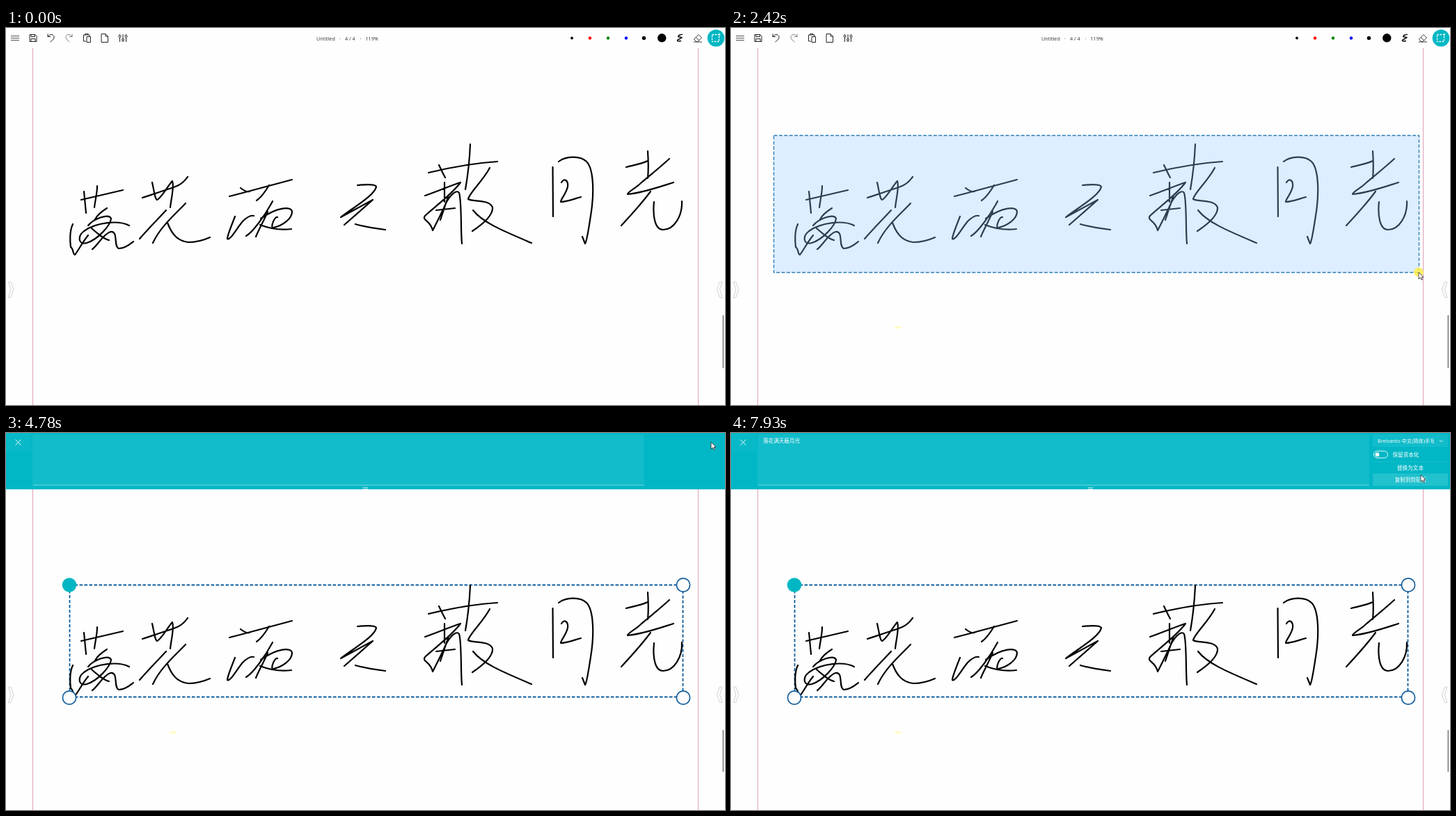
An HTML page for the animation above (7990 ms loop, 1033x542 px).

```html
<!DOCTYPE html>
<html lang="zh">
<head>
<meta charset="utf-8">
<title>Ink selection</title>
<style>
html, body { margin: 0; width: 100%; height: 100%; overflow: hidden; background: #fefefe; }
svg { display: block; width: 1033px; height: 542px; }
text { font-family: "Open Sans", "Noto Sans CJK SC", "Noto Sans CJK", "Noto Sans", sans-serif; font-size: 7.2px; }
.cn text { font-size: 7.6px; fill: #fff; }
.icon { fill: none; stroke: #222; stroke-width: 1; }
.white { stroke: #fff; stroke-width: .9; }
.ink { fill: none; stroke: #000; stroke-width: 2.2; stroke-linecap: round; stroke-linejoin: round; }
.handle { fill: #fefefe; stroke: #15609f; stroke-width: 1.7; }
</style>
</head>
<body>
<svg viewBox="0 0 1033 542">
  <defs><clipPath id="fieldClip"><path d="M923 2H1010V21H923Z"/></clipPath></defs>
  <path d="M38.5 29V542M994.5 29V542" stroke="#dd9fb7"/>
  <ellipse id="trace" cx="240" cy="430.5" rx="5" ry="1.7" fill="#fffcc4"/>

  <g id="page">
    <g id="frame">
      <path d="M91.5 166.5H972.5V327.5H91.5Z" fill="none" stroke="#0d5d9e" stroke-width="1.8" stroke-dasharray="4.6 2.4"/>
    </g>
    <g class="ink">
      <path d="M108 247L168 233M112 235L115 266M131 227C131 238 128 248 127 258"/>
      <path d="M96 282C91 292 92 308 93 315C97 317 96 326 99 326C104 320 109 309 118 298"/>
      <path d="M145 259C137 264 131 269 128 275M118 284C126 274 148 266 151 274C150 284 132 304 116 309C104 312 102 300 112 292C130 279 162 276 177 284"/>
      <path d="M123 288C132 296 140 303 148 305M124 318C132 312 140 296 150 293C162 291 154 314 162 317C171 317 178 311 183 307"/>
      <path d="M196 244C214 238 236 231 246 227C255 223 258 218 261 214M210 222C213 235 214 246 217 247C223 245 233 226 239 220C242 229 237 246 236 258"/>
      <path d="M192 303C205 288 218 275 230 262M258 252C245 266 222 285 211 309M232 280C238 296 246 306 262 308C274 308 284 305 293 301"/>
      <path d="M321 242C352 234 384 225 411 218M337 230C342 234 346 236 350 235M378 226C372 236 366 244 360 248"/>
      <path d="M329 271C324 284 318 298 318 303C322 306 330 290 340 278C346 272 352 269 356 270M345 299C354 294 372 270 383 249"/>
      <path d="M376 264C370 278 362 292 359 300M366 274C390 257 410 256 411 264C411 274 398 284 384 287C379 288 386 270 390 272M365 283C378 288 395 291 410 289"/>
      <path d="M505 226C515 225 530 224 532 228C530 240 502 256 481 272L527 247L486 283M502 282C515 286 530 288 545 290"/>
      <path d="M667 167C666 190 663 215 660 232M607 208C640 200 675 194 706 192M622 197C625 203 627 208 631 215"/>
      <path d="M602 241C620 235 640 226 653 222C640 240 612 260 602 270C597 277 610 276 613 291C616 285 624 270 633 250C640 238 648 232 651 237C655 250 653 290 655 310M630 222V250M618 262L645 259M636 240L624 276"/>
      <path d="M695 201C685 220 665 238 664 246C670 250 695 246 699 258C700 270 682 284 670 292M671 262C685 280 715 292 755 309"/>
      <path d="M785.500 200L786 271M794 192C804 184 825 183 834 192C845 203 845 240 840 270C837 290 834 308 832 310L828 300M798 222C802 215 808 219 807 228C805 238 797 246 797 250C805 250 815 246 826 243"/>
      <path d="M922 177C923 192 923 206 922 216M891 200C903 197 914 195 922 191M953 188C940 200 925 212 912 223C905 230 893 236 893 239C915 237 940 228 959 222"/>
      <path d="M926 235C915 250 897 270 884 284M931 250C929 270 932 290 944 290C960 290 972 270 971 249"/>
    </g>
    <g id="handles">
      <circle cx="91" cy="166.500" r="10.300" fill="#02b7c3"/>
      <g class="handle">
        <circle cx="973" cy="166.500" r="9.600"/><circle cx="91" cy="328.500" r="9.600"/><circle cx="973" cy="328.500" r="9.600"/>
      </g>
    </g>
  </g>

  <rect id="lasso" x="61.500" y="154.500" fill="rgba(142,200,255,.31)" stroke="#2a7ab5" stroke-width="1.3" stroke-dasharray="5 2.400"/>

  <g fill="#fefefe" stroke="#d2d2d2">
    <path d="M3.500 365H7L11 376L7 387.500H3.500L7 376Z"/>
    <path d="M1029 365H1025.500L1021.500 376L1025.500 387.500H1029L1025.500 376Z"/>
  </g>
  <rect id="scroll" x="1029.700" width="1.300" fill="#666"/>

  <g id="mainBar">
    <path d="M0 0H1033V29H0Z" fill="#fefefe"/>
    <g class="icon">
      <path d="M7 11.500H19M7 14.500H19M7 17.500H19" stroke-width=".8"/>
      <path d="M34 9.500H42L44 11.500V19.500H34ZM36 9.500V12.500H41.500V9.500M36 19.500V15.500H42V19.500"/>
      <path d="M60 8.500V12.500H64M60 12.500C64 7 70 10 69 14C68 17 66 18 63.500 20"/>
      <path d="M95 8.500V12.500H91M95 12.500C91 7 85 10 86 14C87 17 89 18 91.500 20" stroke="#666" stroke-width=".8"/>
      <path d="M115 19H111.500V10H120V12M113.500 10V8.500H118V10M116 12.500H121.500V20.500H116Z"/>
      <path d="M137 8.500H143L146.500 12V20.500H137ZM143 8.500V12H146.500"/>
      <path d="M163.500 9V20M168 9V20M172.500 9V20"/>
      <g fill="#fefefe"><circle cx="163.500" cy="12" r="1.500"/><circle cx="168" cy="17" r="1.500"/><circle cx="172.500" cy="12" r="1.500"/></g>
      <path d="M972 9.500C969 9 965 11 966 12.500L971 13.500C971 15 966 16 964.500 17.500C964 19.500 968 19 970 18.500" style="stroke:#000;stroke-width:1.400"/>
      <path d="M988.500 16L995 9.500L999.500 14L994 19.500H991.500ZM991 13.500L996 18M988 20H1000" stroke-width=".9"/>
    </g>
    <g fill="#333">
      <text x="446" y="17.500">Untitled</text><text x="479" y="17.500">·</text>
      <text x="487" y="17.500">4 / 4</text><text x="508.500" y="17.500">·</text><text x="516.500" y="17.500">119%</text>
    </g>
    <circle cx="813" cy="14.500" r="1.900"/><circle cx="839" cy="14.500" r="2.200" fill="#f00"/>
    <circle cx="865" cy="14.500" r="2.200" fill="#080"/><circle cx="891" cy="14.500" r="2.200" fill="#00f"/>
    <circle cx="916.500" cy="14.500" r="2.700"/><circle cx="942.300" cy="14.300" r="6.200"/>
    <circle cx="1020" cy="14.500" r="12.200" fill="#02b7c3"/>
    <path d="M1014.500 9.500H1022M1024.500 12V19.500H1014.500V9.500" class="icon" style="stroke:#fff;stroke-width:1.300;stroke-dasharray:2.500 1.500"/>
    <path d="M1024.500 7.500V11.500M1022.500 9.500H1026.500" stroke="#fff"/>
  </g>

  <g id="editBar" class="cn">
    <path d="M0 0H1033V29H0Z" fill="#02b7c5"/>
    <path d="M15 11.500L21 17.500M21 11.500L15 17.500" class="icon white"/>
    <text x="43" y="17.700">38</text>
    <g class="icon white">
      <path d="M772 11H780L776 19ZM774 11L776 15L778 11"/>
      <path d="M806 10L810 17M810 10L806 17"/><circle cx="805.800" cy="18" r="1.200"/><circle cx="810.200" cy="18" r="1.200"/>
      <path d="M843 10.500H848V17H843ZM848 12.500H850.500V19H845V17"/>
      <path d="M885 18H882V11H888.500V13M884 11V10H887V11M885 13.500H889.500V19H885Z"/>
      <path d="M923 12H920.500V17.500H923M926 12H928.500V17.500H926M923 11V18.500H925.500V11Z"/>
      <path d="M959.500 11.500H966.500M962 11.500V10H964.500V11.500M960.300 11.500V19H965.700V11.500M962 13.500V17M964 13.500V17"/>
      <path d="M998 16L1000 11L1002 16M999 14.500H1001M1001.500 18L1003.500 13L1005.500 18"/>
    </g>
    <g id="tools"></g>
  </g>

  <g id="panel" class="cn">
    <path d="M0 0H1033V81H0Z" fill="#02b7c5"/>
    <path d="M0 0H36V28H0Z" fill="#08b9c7"/>
    <path d="M38 2H917V76H38Z" fill="#12bcca"/>
    <path d="M39 75H917" stroke="#7fdde4" stroke-width=".8"/>
    <path d="M13.500 9.500L21.500 17.500M21.500 9.500L13.500 17.500" class="icon white"/>
    <path d="M512.500 78.500H520M512.500 80.500H520" stroke="#bdeef2" stroke-width=".9"/>
    <g id="result">
      <path d="M922 2H1030V20H922Z" fill="#12bcca"/>
      <path id="hover" d="M922 58H1030V76H922Z" fill="#22c1ce"/>
      <path d="M922 41.500H1030M922 58.500H1030" stroke="#1fc0cc" stroke-width=".8"/>
      <text x="46" y="14.200">落花满天蔽月光</text>
      <text x="929" y="14.200" clip-path="url(#fieldClip)" style="font-size:7.300px">Brelvanto 中文(简体)手写</text>
      <path d="M1018 10.500L1020 12.500L1022 10.500" class="icon white"/>
      <rect x="923.500" y="26" width="20" height="9.800" rx="4.900" class="icon white"/>
      <circle cx="928.500" cy="30.900" r="2.900" fill="#fff"/>
      <text x="950.500" y="33.800">保留资本化</text>
      <g text-anchor="middle"><text x="976" y="52.800">替换为文本</text><text x="976.500" y="70.200">复制到剪贴板</text></g>
    </g>
  </g>

  <g id="cursor">
    <circle id="press" r="6.800" fill="#fff04a" opacity=".85"/>
    <path d="M0 0V10L2.300 7.900L4 11.200L5.500 10.500L4 7.300H7Z" fill="#fff" stroke="#222" stroke-width=".8"/>
  </g>
</svg>
<script>
const LOOP = 7990, LAG = 33;
const $ = id => document.getElementById(id);
const show = (id, on) => { $(id).style.display = on ? "" : "none"; };

// Pointer route: time, x, y
const route = [
  [200, 1022, 78], [380, 880, 230], [620, 500, 385], [800, 240, 400], [980, 100, 330],
  [1130, 61, 154], [1220, 61, 154], [1400, 90, 260], [1607, 161, 414], [1640, 239, 425],
  [1820, 631, 390], [1847, 716, 379], [1880, 781, 364], [2100, 965, 352], [2300, 988, 351],
  [3020, 988, 351], [3300, 986, 220], [3640, 985, 90], [3820, 985, 90], [4060, 989, 40],
  [4360, 1013, 13], [4780, 1013, 13], [5140, 1001, 27], [5440, 1001, 27], [6180, 1017, 9],
  [7260, 1017, 9], [7860, 991, 60], [LOOP, 991, 60]
];

"笔784 剪切816.5 复制855 粘贴893.5 克隆932.5 删除971.5 识别1010".split(" ").forEach(item => {
  const [, label, x] = item.match(/^(\D+)([\d.]+)$/);
  const node = document.createElementNS("http://www.w3.org/2000/svg", "text");
  node.setAttribute("x", x);
  node.setAttribute("y", 17.4);
  node.style.fontSize = "6.8px";
  node.textContent = label;
  $("tools").append(node);
});

const slope = (i, k) => {
  const a = route[i], b = route[i + 1];
  return a && b ? (b[k] - a[k]) / (b[0] - a[0]) : 0;
};
// Monotone tangent: no overshoot at turns and rests
const tangent = (i, k) => {
  const a = slope(i - 1, k), b = slope(i, k);
  return a * b > 0 ? 2 * a * b / (a + b) : 0;
};

function pointer(t) {
  let i = 0;
  while (i < route.length - 2 && t >= route[i + 1][0]) i++;
  const a = route[i], b = route[i + 1], d = b[0] - a[0];
  const u = Math.max(0, (t - a[0]) / d), v = 1 - u;
  return [1, 2].map(k =>
    a[k] * (1 + 2 * u) * v * v + tangent(i, k) * d * u * v * v +
    b[k] * u * u * (3 - 2 * u) - tangent(i + 1, k) * d * u * u * v);
}

function draw(time) {
  const start = time < 3820 ? 200 : 3820;
  const t = start + Math.floor((time - start) / 60 + 1e-6) * 60;
  const selected = t >= 3020, open = t >= 4540;

  show("mainBar", !selected);
  show("editBar", selected && !open);
  show("frame", selected);
  show("handles", selected);
  show("panel", open);
  show("result", t >= 4900);
  show("hover", t >= 7700);
  show("trace", t >= 1760);
  show("cursor", t >= 200);
  show("press", t >= 1160 && !selected);

  $("page").setAttribute("transform", `translate(0 ${open ? 52 : 0})`);
  $("scroll").setAttribute("y", open ? 427 : 413);
  $("scroll").setAttribute("height", open ? 60 : 76);
  $("cursor").setAttribute("transform", `translate(${pointer(t)})`);

  const [x, y] = pointer(t - LAG);
  show("lasso", t > 1220 && !selected);
  $("lasso").setAttribute("width", Math.max(0, x - 61));
  $("lasso").setAttribute("height", Math.max(0, y - 154));
}

const origin = performance.now();
function tick() {
  draw((performance.now() - origin) % LOOP);
  requestAnimationFrame(tick);
}
tick();
</script>
</body>
</html>
```
